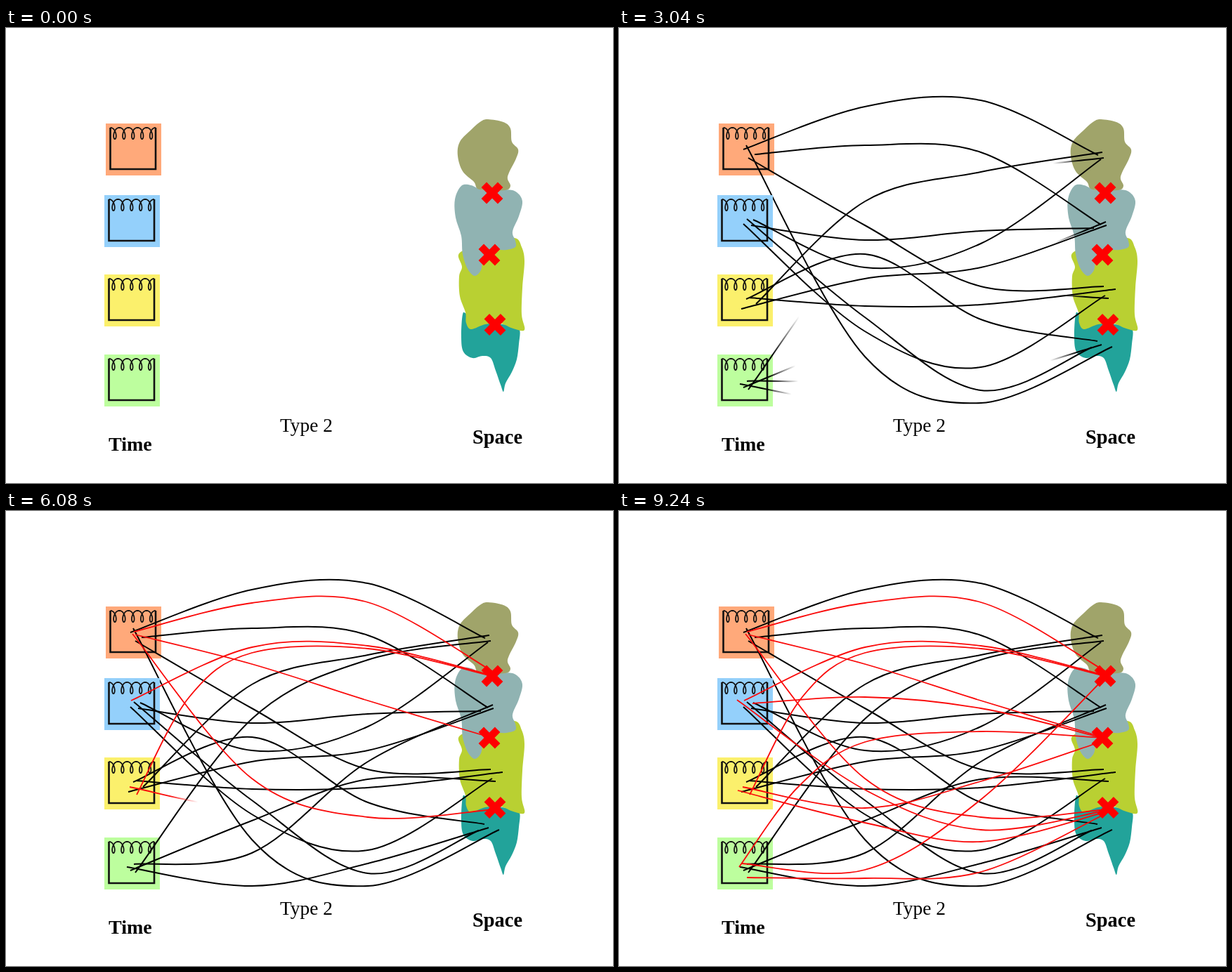
Recreate the animation shown at these times as an HTML page. Size 864x648 px, loop 9.32 s.

```html
<!DOCTYPE html>
<html lang="en">
<head>
<meta charset="utf-8">
<title>Time and Space</title>
<style>
html, body { margin: 0; width: 100%; height: 100%; overflow: hidden; background: #fff; }
svg { display: block; width: 100%; height: 100%; }
text { font-family: "Liberation Serif", "Times New Roman", serif; fill: #000; }
.bold { font-weight: bold; }
</style>
</head>
<body>
<svg id="stage" viewBox="0 0 864 648">
  <defs id="defs"></defs>
  <g id="lands"></g>
  <g id="pads"></g>
  <g id="lines" fill="none"></g>
  <g id="crosses" fill="#fe0000"></g>
  <text class="bold" x="146" y="602" font-size="28">Time</text>
  <text class="bold" x="664" y="592" font-size="28.4">Space</text>
  <text x="390" y="575" font-size="27.4">Type 2</text>
</svg>
<script>
const LOOP = 9320, STEP = 40, FADE = 40;
const $ = id => document.getElementById(id);

function add(parent, tag, attrs) {
  const el = document.createElementNS("http://www.w3.org/2000/svg", tag);
  for (const k in attrs) el.setAttribute(k, attrs[k]);
  parent.appendChild(el);
  return el;
}

const nums = s => s.trim().split(/[ ,]+/).map(Number);
const pairs = a => a.reduce((out, v, i) => (i % 2 ? out[out.length - 1].push(v) : out.push([v]), out), []);

// Smooth curve through the points, open or closed.
function spline(pts, closed) {
  const n = pts.length;
  const at = i => closed ? pts[(i + n) % n] : pts[Math.max(0, Math.min(n - 1, i))];
  let d = "M" + pts[0];
  for (let i = 0; i < (closed ? n : n - 1); i++) {
    const [a, b, c, e] = [at(i - 1), at(i), at(i + 1), at(i + 2)];
    const c1 = b.map((v, k) => v + (c[k] - a[k]) / 6);
    const c2 = c.map((v, k) => v - (e[k] - b[k]) / 6);
    d += `C${c1} ${c2} ${c}`;
  }
  return d + (closed ? "Z" : "");
}

function land(color, s) {
  add($("lands"), "path", { d: spline(pairs(nums(s)), true), fill: color });
}
land("#22a39a", `650,408 656,407 680,418 720,424 731,430 730,450 727,472 720,490 711,506 708,518
  704,508 697,488 690,470 678,467 664,470 651,461 648,440`);
land("#b9d032", `724,299 734,312 738,332 735,370 734,408 738,430 722,428 704,421 682,422 662,429
  655,420 654,405 646,382 645,354 649,340 644,323 658,314 690,304`);
land("#90b3b2", `648,225 662,224 680,231 712,230 727,234 735,247 730,268 721,290 725,303 725,312
  712,316 694,317 680,328 676,345 667,353 657,343 650,322 648,296 640,270 639,244`);
land("#a0a46a", `686,130 708,134 718,143 720,162 729,173 726,186 716,206 714,215 718,225 710,231
  674,230 666,219 650,204 643,182 646,162 663,144 676,133`);

function pad(x, y, color) {
  const g = add($("pads"), "g", { transform: `translate(${x} ${y})` });
  add(g, "rect", { width: 79, height: 74, fill: color });
  const pen = { fill: "none", stroke: "#111" };
  add(g, "path", { d: "M6.5 6V65H71V6", "stroke-width": 2.6, ...pen });
  let d = "";
  for (let i = 0; i <= 120; i++) {
    const a = i / 120 * 10 * Math.PI;
    const px = 6.5 + 64.5 * i / 120 + 4.6 * Math.sin(a);
    d += (i ? "L" : "M") + px.toFixed(1) + " " + (14 - 8.2 * Math.cos(a)).toFixed(1);
  }
  add(g, "path", { d, "stroke-width": 1.7, "stroke-linejoin": "round", ...pen });
}

const lines = [];

// Numbers: start point, optional extra node, heights at x = 350 and 515, end point.
function line(start, dur, dir, color, s, parent = $("lines")) {
  const v = nums(s), tail = v.splice(-4);
  const pts = pairs([...v, 350, tail[0], 515, tail[1], tail[2], tail[3]]);
  const x1 = pts[0][0] - 1, x2 = tail[2] + 1, id = "g" + lines.length;
  const grad = add($("defs"), "linearGradient",
    { id, gradientUnits: "userSpaceOnUse", x1, x2, y1: 0, y2: 0 });
  const stops = [0, 1, 2, 3].map(() => add(grad, "stop", { "stop-color": color }));
  const path = add(parent, "path", {
    d: spline(pts), fill: "none", stroke: `url(#${id})`,
    "stroke-width": color === "#000" ? 2 : 1.8
  });
  lines.push({ start, dur, dir, color, path, stops, span: x2 - x1, id });
}

const BLACK = "#000", RED = "#fa0a0a";

pad(142, 136, "#ffa97a");
// This line runs behind the blue pad.
line(0, 480, "split", BLACK, "181,167 468 534 702,454", $("pads"));
pad(140, 238, "#94d0fb");
pad(140, 351, "#fbf06c");
pad(140, 465, "#bdfe9e");

const together = (start, dur, list) => list.forEach(s => line(start, dur, "split", BLACK, s));
together(0, 480, [
  "177,173 112 103 682,181",
  "193,180 167 177 686,280",
  "184,185 281 368 690,368"
]);
[
  "188,281 302 289 676,285",
  "191,273 341 307 686,187",
  "177,279 432 483 692,381",
  "182,272 412 516 673,455"
].forEach((s, i) => line(485 + i * 482, 480, "split", BLACK, s));
together(2410, 490, [
  "181,386 322 415 681,446",
  "195,393 247 205 688,177",
  "174,400 357 341 694,281",
  "185,384 396 394 707,372"
]);
together(2900, 560, [
  "184,515 296 212 690,185",
  "182,503 487 357 693,276",
  "177,512 441 382 697,385",
  "172,507 534 502 687,451"
]);
[
  ["left", "182,172 131 130 692,228"],
  ["left", "184,176 218 270 688,322"],
  ["right", "180,175 381 436 695,425"],
  ["split", "178,270 194 192 692,234"],
  ["split", "186,404 260,266 202 196 692,235"],
  ["left", "176,393 423 385 688,328"],
  ["left", "175,502 511 411 692,237"],
  ["right", "190,274 265 281 688,323"],
  ["right", "168,269 397 454 695,426"],
  ["left", "169,398 444 471 695,428"],
  ["left", "171,507 255,393 329 314 688,323"],
  ["left", "182,522 523 514 695,430"]
].forEach(([dir, s], i) => line(3600 + i * 479, i === 11 ? 371 : 479, dir, RED, s));

[[692, 235], [688, 323], [696, 422.5]].forEach(([x, y]) => add($("crosses"), "path", {
  d: "M-16.5-5.3H-5.3V-16.5H5.3V-5.3H16.5V5.3H5.3V16.5H-5.3V5.3H-16.5Z",
  transform: `translate(${x} ${y}) rotate(45)`
}));

function reveal(l, t) {
  const p = Math.max(0, Math.min(1, (t - l.start) / l.dur));
  l.path.setAttribute("visibility", p > 0 ? "visible" : "hidden");
  l.path.setAttribute("stroke", p < 1 ? `url(#${l.id})` : l.color);
  if (p <= 0 || p >= 1) return;
  const fromLeft = l.dir !== "right", fromRight = l.dir !== "left";
  const reach = l.dir === "split" ? l.span / 2 : l.span;
  const front = p * (reach + FADE);
  const tip = Math.min(front, reach), solid = Math.max(0, front - FADE);
  // Opacity at a distance d behind the moving front.
  const alpha = d => Math.max(0, Math.min(1, (front - d) / FADE));
  const set = (i, x, a) => {
    l.stops[i].setAttribute("offset", x / l.span);
    l.stops[i].setAttribute("stop-opacity", a);
  };
  if (fromLeft) {
    set(0, solid, alpha(solid));
    set(1, tip, alpha(tip));
  } else {
    set(0, 0, 0);
    set(1, l.span - tip, alpha(tip));
  }
  if (fromRight) {
    set(2, l.span - tip, alpha(tip));
    set(3, l.span - solid, alpha(solid));
  } else {
    set(2, tip, alpha(tip));
    set(3, l.span, alpha(tip));
  }
}

function draw(now) {
  const t = Math.min(9240, Math.floor(now % LOOP / STEP) * STEP);
  lines.forEach(l => reveal(l, t));
}

const begin = performance.now();
function tick() {
  draw(performance.now() - begin);
  requestAnimationFrame(tick);
}
tick();
</script>
</body>
</html>
```
